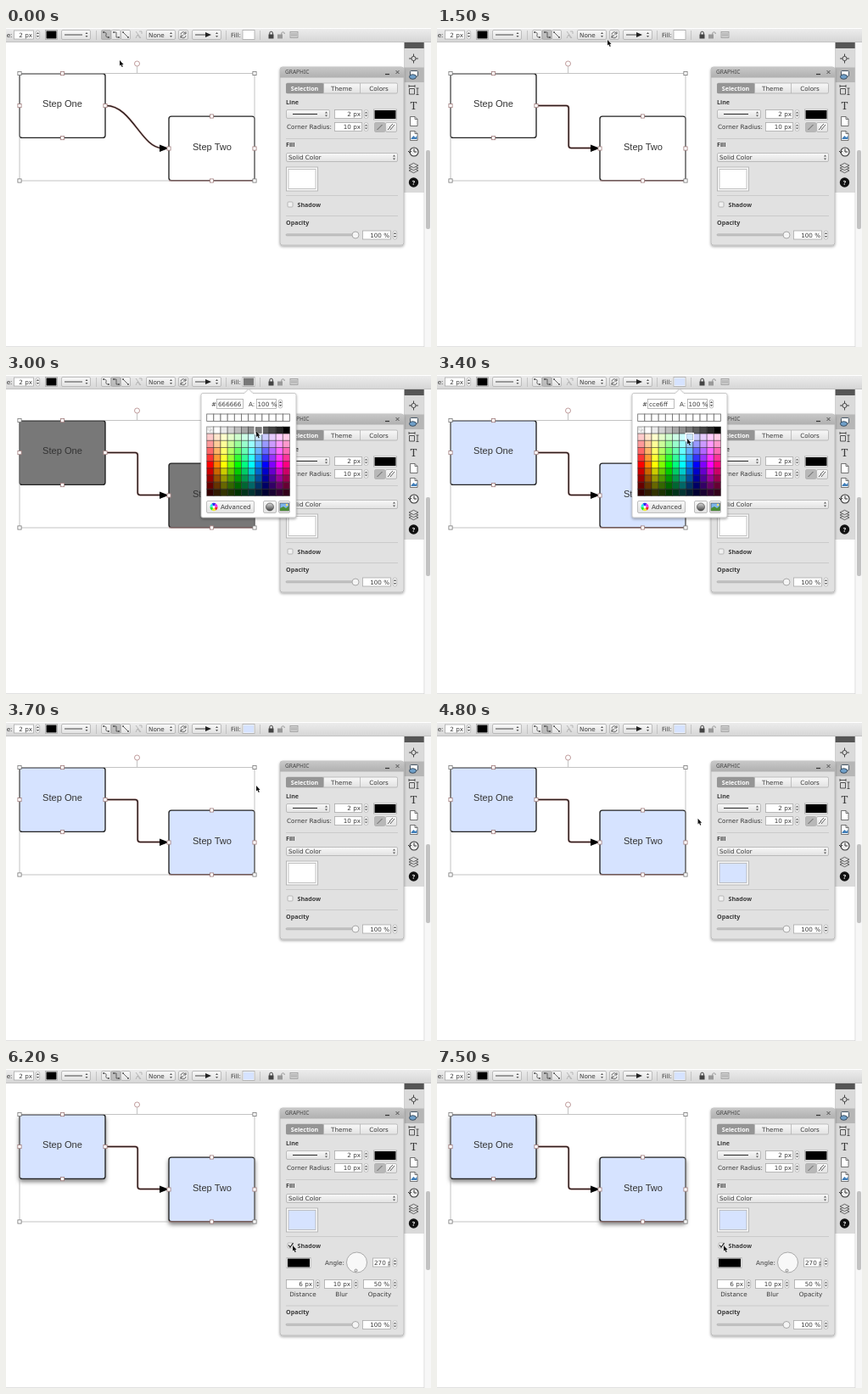
Recreate the animation shown at these times as an HTML page. Size 501 px wide and 376 px high, loop 8400 ms.

```html
<!DOCTYPE html>
<html lang="en">
<head>
<meta charset="utf-8">
<title>Diagram editor</title>
<style>
html, body { margin: 0; width: 100%; height: 100%; overflow: hidden; background: #fff; }
svg { display: block; width: 100%; height: 100%; }
text { font: 7.2px "DejaVu Sans", sans-serif; fill: #3a3a3a; white-space: pre; }
.bold { font: 700 7.1px "Noto Sans", sans-serif; }
.title { font: 6.6px "Noto Sans", sans-serif; fill: #444; }
.step { font: 11.1px "Liberation Sans", Arial, sans-serif; fill: #333; }
.end { text-anchor: end; }
.mid { text-anchor: middle; }
.white { fill: #fff; }
</style>
</head>
<body>
<svg id="stage" viewBox="0 0 501 376" preserveAspectRatio="none"></svg>
<script>
const LOOP = 8400, STEP = 100;
const GRAY = '#787878', BLUE = '#d6e3ff';

// Markup helpers
const rect = (x, y, w, h, fill, more = '') =>
  `<rect x="${x}" y="${y}" width="${w}" height="${h}" fill="${fill}" ${more}/>`;
const path = (d, stroke = '#444', width = 1, fill = 'none', more = '') =>
  `<path d="${d}" stroke="${stroke}" stroke-width="${width}" fill="${fill}" ${more}/>`;
const circle = (x, y, r, fill, stroke = 'none', width = 1, more = '') =>
  `<circle cx="${x}" cy="${y}" r="${r}" fill="${fill}" stroke="${stroke}" stroke-width="${width}" ${more}/>`;
const text = (x, y, s, cls = '') => `<text x="${x}" y="${y}" class="${cls}">${s}</text>`;
const group = (id, content) => `<g id="${id}">${content}</g>`;
const framed = (x, y, w, h, fill, stroke = '#aaa', more = '') =>
  rect(x + .5, y + .5, w - 1, h - 1, fill, `stroke="${stroke}" stroke-width=".8" ${more}`);
const button = (x, y, w, h, fill = 'url(#button)') => framed(x, y, w, h, fill, '#b0b0b0', 'rx="1.5"');
const arrows = (x, y) =>
  path(`M${x - 1.5} ${y - 1}l1.5 -2 1.5 2zM${x - 1.5} ${y + 1}l1.5 2 1.5 -2z`, 'none', 0, '#555');
const stepper = (x, y) => framed(x - 2.7, y - 5.5, 5.4, 11, '#f4f4f4', '#b5b5b5', 'rx="2"') + arrows(x, y);
const field = (x, y, w, s) => framed(x, y, w, 11, '#fff') +
  text(x + w - 2, y + 8.2, s, 'end') + stepper(x + w + 4.5, y + 5.5);
const swatch = (x, y, w, h, fill, id) =>
  framed(x, y, w, h, '#fff') + rect(x + 1.5, y + 1.5, w - 3, h - 3, fill, id ? `id="${id}"` : '');
const divider = y => path(`M330 ${y}H462`, '#c4c4c4', .8);
const handle = (x, y, color = '#a07c7c') => framed(x - 2.6, y - 2.6, 5.2, 5.2, '#fff', color);

const defs = () => {
  const fade = (id, a, b) => `<linearGradient id="${id}" x2="0" y2="1">
    <stop stop-color="${a}"/><stop offset="1" stop-color="${b}"/></linearGradient>`;
  return `<defs>${fade('bar', '#ececec', '#d6d6d6')}${fade('button', '#f8f8f8', '#e2e2e2')}
    ${fade('title', '#c8c8c8', '#b0b0b0')}${fade('ball', '#ddd', '#444')}
    <filter id="soft" x="-20%" y="-20%" width="140%" height="140%">
      <feDropShadow dx="0" dy="1.5" stdDeviation="1.5" flood-opacity=".35"/></filter>
    <filter id="drop" x="-20%" y="-20%" width="140%" height="150%">
      <feDropShadow dx="0" dy="3" stdDeviation="2.4" flood-opacity=".5"/></filter></defs>`;
};

const connectorIcon = (x, d) => path(`M${x} 5${d}`, '#444', .8) +
  rect(x - .8, 4.2, 1.6, 1.6, '#444') + rect(x + 5.2, 10.2, 1.6, 1.6, '#444');

const toolbar = () => rect(0, 1, 501, 15.5, 'url(#bar)') + path('M0 16.5H501', '#b8b8b8', .8) +
  text(7.5, 10.8, 'ne:', 'end') + field(9, 2.5, 24, '2 px') +
  swatch(46, 2, 15, 12, '#000') +
  button(65, 2, 35, 12) + path('M69 8H90') + arrows(95, 8) +
  path('M106.5 3V14M259.5 3V14M299.5 3V14', '#bbb', .8) +
  button(112, 2, 12, 12) + button(123.5, 2, 12, 12) + button(135, 2, 12, 12) +
  rect(112.5, 2.5, 11, 11, '#999', 'id="pressed" opacity=".55"') +
  connectorIcon(115, 'q4 0 3 3t3 3') + connectorIcon(127, 'h3v6h3') + connectorIcon(138, 'l6 6') +
  path('M153 4l6 8M153 12l2-4 3 4M157 4h3v3', '#aaa', .8) +
  button(165, 2, 35, 12) + text(168, 10.8, 'None') + arrows(194.5, 8) +
  button(203, 2, 12, 12) + path('M206 7.5a3 3 0 0 1 5-2l1 1M212 9a3 3 0 0 1-5 2l-1-1M212 4v3h-3M206 12v-3h3', '#444', .8) +
  button(219, 2, 35, 12) + path('M223 8h12') + path('M235 5l7 3-7 3z', 'none', 0, '#222') + arrows(248.5, 8) +
  text(265, 10.8, 'Fill:') + swatch(278.5, 2, 15, 12, '#fff', 'barFill') +
  rect(309.5, 7.5, 6, 5, '#444') + path('M310.8 8V6a1.8 1.8 0 0 1 3.6 0v2', '#444') +
  rect(320, 7.5, 6, 5, '#999') + path('M324.8 8V6a1.8 1.8 0 0 1 3.4 0v1', '#999') +
  framed(334.5, 4, 10, 8, '#d4d4d4', '#999') + path('M336 7h7M336 9h7', '#999', .8);

const box = (x, y) => rect(x, y, 101, 75.7, '#fff', 'class="box" rx="3" stroke="#222" stroke-width="1.35"');
const boxHandles = (x, y) => handle(x + 50.5, y) + handle(x + 101, y + 38) + handle(x + 50.5, y + 76) + handle(x, y + 38);
const connector = (id, d) => group(id, path(d, '#e9d0cd', 2.8) + path(d, '#2c1c1c', 1.5));

const diagram = () =>
  group('boxes', box(16, 53.7) + box(192, 104.1)) +
  text(66.5, 93.3, 'Step One', 'step mid') + text(243, 143.8, 'Step Two', 'step mid') +
  path('M16 53.5H293V180H16zM154.5 45V53', '#b4b4b4', .8) +
  path('M192 180H293', '#a66', .6) +
  connector('curve', 'M118 91.5C148 91.5 160 141.5 184 141.5') +
  connector('elbow', 'M118 91.5H152.2Q155.2 91.5 155.2 94.5V138.5Q155.2 141.5 158.2 141.5H184') +
  path('M181 137.4L192 141.7L181 146z', 'none', 0, '#000') +
  boxHandles(16, 53.6) + boxHandles(192, 104) +
  [[16, 53.5], [293, 53.5], [16, 180], [293, 180]].map(([x, y]) => handle(x, y, '#777')).join('') +
  circle(154.5, 42, 3, '#fff', '#b89090', .9);

const sidebar = () => rect(469, 17, 24, 177, '#dadada') + rect(469, 17, 24, 7, '#555') +
  rect(469, 46.5, 24, 17.5, '#b6b6b6') + path('M469.5 17V194M493 17V376', '#ccc', .7) +
  circle(480.5, 36, 2.6, 'none', '#444') + path('M480.5 30.5v3M480.5 38.5v3M475 36h3M483 36h3') +
  rect(476.5, 50.5, 9, 6.5, '#fff', 'rx="1" stroke="#345" stroke-width=".9"') +
  `<ellipse cx="479.5" cy="57.5" rx="4" ry="2.8" fill="#6f9fc8" stroke="#234" stroke-width=".8"/>` +
  path('M475 68.5h7M475 67v3M482 67v3M475.5 71.5h6v6.5h-6zM485 71v7.5M483.5 71h3M483.5 78.5h3', '#444', .9) +
  `<text x="480.5" y="95.7" class="mid" style="font:13px 'Noto Serif',serif">T</text>` +
  [104.5, 121.5].map(y => path(`M476.5 ${y}h5.5l3 3v8h-8.5z`, '#555', .8, '#fff') +
    path(`M482 ${y}v3h3`, '#555', .8)).join('') +
  path('M477.5 130l3-3 2 2 2-2v4h-7z', 'none', 0, '#3f7db8') +
  circle(481, 146, 5, '#eee', '#333', 1.1) + path('M481 142.5V146h3M474 145l2 2 2-2', '#333') +
  [168, 165, 162].map(y => path(`M475 ${y}l5.5-2.7 5.5 2.7-5.5 2.7z`, '#444', .8, '#ddd')).join('') +
  circle(480.5, 182, 5.7, '#111') + text(480.5, 184.8, '?', 'mid bold white') +
  rect(494, 17, 7, 359, '#f7f7f7') + rect(495, 144, 5, 93, '#c2c2c2', 'rx="2"') +
  path('M0 375.5H493', '#d4d4d4', .7);

const shadowControls = () => swatch(330.5, 222, 29, 13, '#000') +
  text(376, 230.7, 'Angle:') + circle(413.5, 228, 12, '#f8f8f8', '#999', .8) + circle(412.5, 237.5, 1.5, '#eee', '#666', .7) +
  framed(432, 222.5, 21, 11, '#fff') + text(434, 230.7, '270') +
  `<svg x="449" y="222" width="3.5" height="12"><text x="1" y="8.7">p</text></svg>` + stepper(458.5, 228) +
  field(330, 248, 33, '6 px') + field(375, 248, 33, '10 px') + field(421, 248, 33, '50 %') +
  text(350, 268, 'Distance', 'mid') + text(395.5, 268, 'Blur', 'mid') + text(440.5, 268, 'Opacity', 'mid') +
  path('M333 207.5l2 2.5 3.5-5', '#222', 1.2);

const panel = () =>
  rect(323, 46, 146, 210, '#e1e1e1', 'id="panelBody" rx="3" stroke="#b4b4b4" stroke-width=".8" filter="url(#soft)"') +
  path('M323 58.5V49q0-3 3-3H466q3 0 3 3V58.5z', 'none', 0, 'url(#title)') +
  text(329, 54.4, 'GRAPHIC', 'title') + path('M447 54.5h5', '#333', 1.2) + path('M459.5 50l4 4M463.5 50l-4 4', '#444', .9) +
  button(330, 64.5, 132, 13) + rect(330, 65, 44.5, 12, '#959595', 'rx="1.5"') + path('M374.5 65v12M417.5 65v12', '#b4b4b4', .8) +
  text(352, 73.6, 'Selection', 'bold mid white') + text(395.5, 73.6, 'Theme', 'mid') + text(439.5, 73.6, 'Colors', 'mid') +
  text(330, 89.5, 'Line', 'bold') + button(330, 96, 52, 11) + path('M338 101.5H367', '#333', 1.1) + arrows(377.5, 101.5) +
  field(387, 96, 33, '2 px') + swatch(433, 95.5, 28, 13, '#000') +
  text(331, 119.3, 'Corner Radius:') + field(387, 111, 33, '10 px') +
  button(434, 111, 13.5, 12, '#b8b8b8') + button(447, 111, 14, 12) + path('M437.5 120l6-6M450 120l3-3M453 120l5-6M452 117l4-4', '#555', .9) +
  divider(130.5) + text(330, 140, 'Fill', 'bold') +
  button(330, 147, 132, 11) + text(333, 155, 'Solid Color') + arrows(457.5, 152.5) +
  framed(330, 163.5, 38, 29, '#f8f8f8') +
  rect(333, 166.5, 32, 23, '#fff', 'id="panelFill" stroke="#b4b4b4" stroke-width=".8"') +
  divider(197.5) + framed(331.5, 204.5, 7, 7, '#f2f2f2', '#aaa', 'rx="1"') + text(343.5, 210.6, 'Shadow', 'bold') +
  group('shadowControls', shadowControls()) +
  group('opacity', divider(221.5) + text(330, 231.7, 'Opacity', 'bold') +
    rect(330, 242.7, 84, 2.2, '#c4c4c4', 'rx="1.1" stroke="#a4a4a4" stroke-width=".5"') +
    circle(412, 244, 4, '#f5f5f5', '#999', .8) + field(420, 238.5, 34, '100 %'));

const CELL = 8.15, GRID_X = 236.7, GRID_Y = 61;
const cellColor = (col, row) => {
  if (row) return `hsl(${col * 30} 100% ${100 - row * 10}%)`;
  const level = 255 * ((11 - Math.max(col, 1)) / 10) ** .82;
  return `rgb(${level} ${level} ${level})`;
};
const palette = () => {
  let cells = '';
  for (let row = 0; row < 10; row++)
    for (let col = 0; col < 12; col++)
      cells += rect(GRID_X + col * CELL, GRID_Y + row * CELL, CELL, CELL, cellColor(col, row),
        'stroke="#222" stroke-opacity=".5" stroke-width=".9"');
  return cells + path('M237.5 69l7-7M238 62h3v3h-3zM241 65h3v3h-3z', '#bbb', .6);
};
const wheel = () => Array.from({ length: 6 }, (_, i) =>
  path('M0 0L4.6 0A4.6 4.6 0 0 1 2.3 4z', 'none', 0, `hsl(${i * 60} 85% 55%)`, `transform="translate(245 155.5) rotate(${i * 60})"`)).join('');

const picker = () =>
  path('M232 21.5H281L286 16.5L291 21.5H340q2 0 2 2V166q0 2-2 2H232q-2 0-2-2V23.5q0-2 2-2z', '#bbb', .8, '#fff', 'filter="url(#soft)"') +
  text(242, 36.6, '#') + framed(248, 28, 32, 12, '#fff') + '<text id="hex" x="250" y="36.6"></text>' +
  text(286, 36.6, 'A:') + framed(295, 28, 24, 12, '#fff') + text(296.5, 36.6, '100 %') + stepper(323.5, 34) +
  Array.from({ length: 12 }, (_, i) => rect(GRID_X + i * CELL, 46, CELL, 8.5, '#fff', 'stroke="#666" stroke-width=".8"')).join('') +
  palette() + rect(-.5, -.5, 9, 9, 'none', 'id="chosen" stroke="#fff" stroke-width="1.4"') +
  button(236, 148, 57, 15) + wheel() + circle(245, 155.5, 1.5, '#fff') + text(253, 158.2, 'Advanced') +
  button(303, 148, 16, 15) + circle(311, 155.5, 4.5, 'url(#ball)', '#333', .6) +
  button(321, 148, 14, 15) + rect(323, 151, 10.5, 9, '#7db4ea', 'stroke="#333" stroke-width=".6"') +
  path('M323 160v-3l4-2 3 2 3.5-3v6z', 'none', 0, '#4a8d35') + circle(331, 153, 1.2, '#ffe36a');

const pointer = () => circle(.5, 1, 10.8, 'none', '#111', 1.4, 'id="ring"') +
  path('M0 0V6.6L1.5 5.3L2.6 7.9L3.8 7.4L2.7 4.9H4.6z', '#fff', .5, '#111', 'paint-order="stroke"');

const stage = document.getElementById('stage');
stage.innerHTML = defs() + diagram() + toolbar() + sidebar() + group('panel', panel()) +
  group('picker', picker()) + group('pointer', pointer());
const el = id => document.getElementById(id);
const show = (id, on) => el(id).setAttribute('display', on ? 'inline' : 'none');
const set = (id, name, value) => el(id).setAttribute(name, value);
const boxes = [...document.querySelectorAll('.box')];

// Pointer stops: time, x, y, and whether the approach is at even speed
const stops = [
  [0, 134, 38], [200, 134, 38], [800, 130.5, 12], [1100, 130.5, 12],
  [1500, 201, 14, true], [1900, 285.5, 8.5, true], [2200, 285.5, 8.5],
  [2700, 295, 66.5], [3000, 295, 66.5], [3300, 295, 75], [4300, 295, 75],
  [5700, 338, 208], [LOOP, 338, 208]
];
const clicks = [[1000, 1100], [1900, 2100], [2700, 2800], [3300, 3400], [5700, 6000]];

function pointerAt(t) {
  const i = stops.findIndex(stop => stop[0] > t);
  const [t0, x0, y0] = stops[i - 1], [t1, x1, y1, even] = stops[i];
  const p = (t - t0) / (t1 - t0), e = even ? p : p * p * (3 - 2 * p);
  return [x0 + (x1 - x0) * e, y0 + (y1 - y0) * e];
}

function render(t) {
  const elbow = t >= 1100, shadow = t >= 6000;
  const fill = t < 2800 ? '#fff' : t < 3400 ? GRAY : BLUE;
  const [col, row, hex] = t < 2800 ? [1, 0, 'ffffff'] : t < 3400 ? [7, 0, '666666'] : [7, 1, 'cce6ff'];

  show('curve', !elbow);
  show('elbow', elbow);
  set('pressed', 'x', elbow ? 124 : 112.5);

  boxes.forEach(b => b.setAttribute('fill', fill));
  set('barFill', 'fill', fill);
  set('panelFill', 'fill', t < 3900 ? '#fff' : BLUE);
  show('picker', t >= 2100 && t < 3700);
  el('hex').textContent = hex;
  set('chosen', 'transform', `translate(${GRID_X + col * CELL} ${GRID_Y + row * CELL})`);

  set('boxes', 'filter', shadow ? 'url(#drop)' : 'none');
  show('shadowControls', shadow);
  set('panelBody', 'height', shadow ? 268 : 210);
  set('opacity', 'transform', `translate(0 ${shadow ? 57.5 : 0})`);

  set('pointer', 'transform', `translate(${pointerAt(t)})`);
  show('ring', clicks.some(([from, to]) => t >= from && t < to));
}

function tick() {
  render(Math.floor(performance.now() % LOOP / STEP) * STEP);
  requestAnimationFrame(tick);
}
tick();
</script>
</body>
</html>
```
